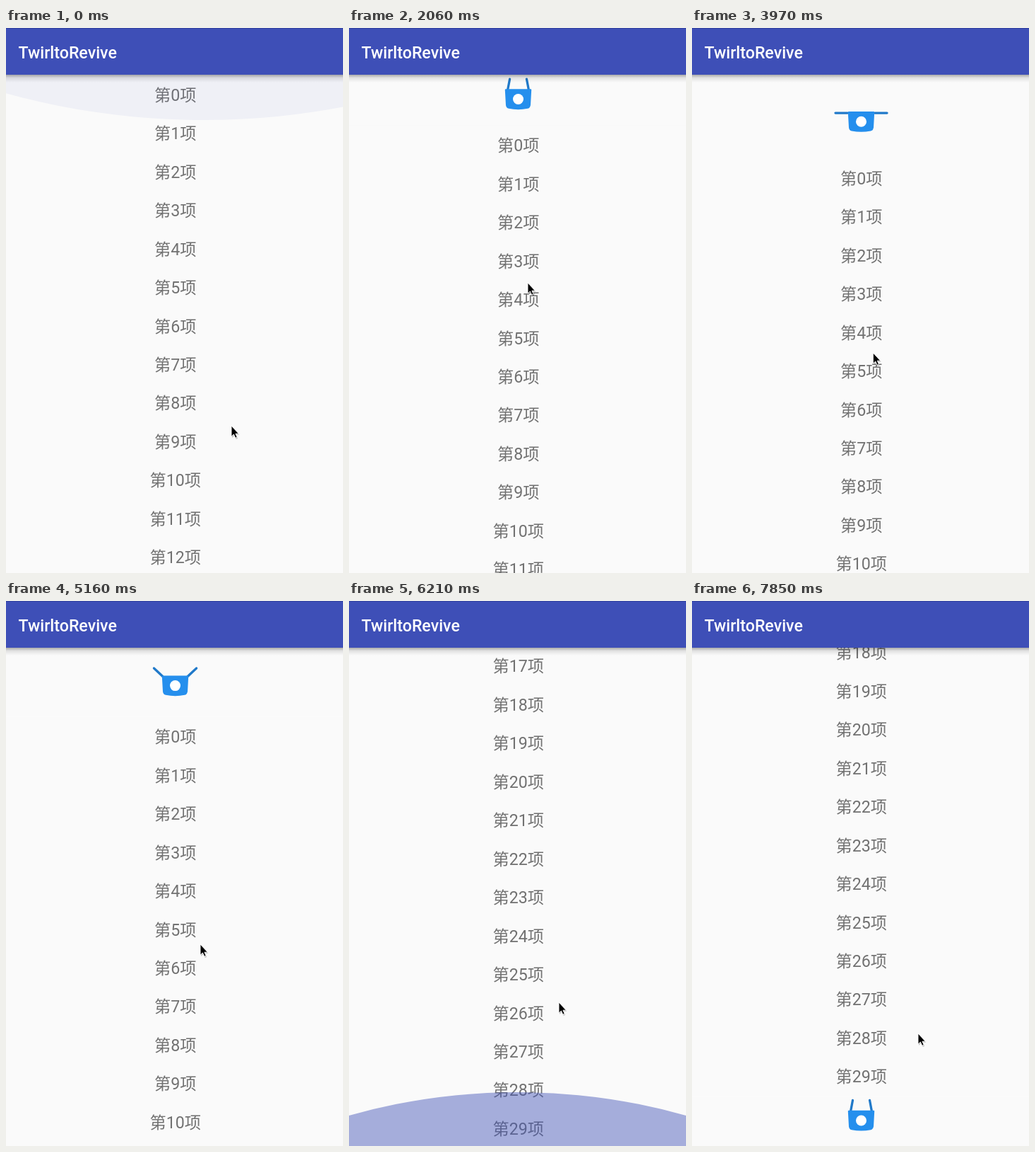
Recreate the animation shown at these times as an HTML page. Size 477x770 px, loop 8000 ms.

```html
<!DOCTYPE html>
<html lang="zh-CN">
<head>
<meta charset="utf-8">
<title>Pull list</title>
<style>
  html, body { margin: 0; width: 100%; height: 100%; overflow: hidden; background: #fafafa; }
  svg { display: block; width: 477px; height: 770px; }
  text { font-family: Roboto, "Noto Sans CJK SC", "Noto Sans CJK", sans-serif; font-size: 23.2px; }
  #items text { fill: #727272; text-anchor: middle; }
  .title { fill: #fff; font-weight: 500; }
  .arm { stroke: #2079c9; stroke-width: 3.3; stroke-linecap: round; }
</style>
</head>
<body>
<svg viewBox="0 0 477 770">
  <defs>
    <linearGradient id="shade" x2="0" y2="1">
      <stop offset="0" stop-color="#000" stop-opacity=".32"/>
      <stop offset=".4" stop-color="#000" stop-opacity=".1"/>
      <stop offset="1" stop-color="#000" stop-opacity="0"/>
    </linearGradient>
  </defs>
  <rect width="477" height="770" fill="#fafafa"/>

  <g id="bag">
    <line id="armL" class="arm" x1="-15.5" y1="-12" x2="-15.5" y2="-29.2"/>
    <line id="armR" class="arm" x1="15.5" y1="-12" x2="15.5" y2="-29.2"/>
    <path fill="#258fed" d="M-17.7 -14.2H17.7Q18.8 -14.2 18.7 -13L17.5 8.5Q17 12.5 13.5 13.2Q0 16 -13.5 13.2Q-17 12.5 -17.5 8.5L-18.7 -13Q-18.8 -14.2 -17.7 -14.2Z"/>
    <circle r="7.5" fill="#fff"/>
  </g>

  <g id="list">
    <rect y="66" width="477" height="1634.8" fill="#fafafa"/>
    <g id="items"></g>
  </g>

  <circle id="topGlow" cx="280" cy="-930" r="1060" fill="#3f51b5"/>
  <circle id="endGlow" cx="238.5" cy="1572" r="878" fill="#3f51b5"/>

  <rect y="66" width="477" height="11" fill="url(#shade)"/>
  <rect width="477" height="66" fill="#3e4fb7"/>
  <rect width="477" height="1" fill="#303f9f"/>
  <text class="title" x="17.5" y="43">TwirltoRevive</text>

  <g id="cursor">
    <path d="M1 1.5V17L4.4 13.8L6.7 19L9.2 18L6.9 12.8H11.4Z" fill="#000" opacity=".2"/>
    <path d="M0 0V15.2L3.4 12L5.7 17.2L8.2 16.2L5.9 11.2H10.4Z" fill="#000" stroke="#fff" stroke-width=".9"/>
  </g>
</svg>
<script>
const LOOP = 8000, STEP = 148, ROW = 54.45, END = -928;

// Pointer moves: start, end, then the place reached
const moves = [
  [142, 882, 249, 277], [1100, 2066, 253, 360], [2066, 2954, 237, 432],
  [3690, 4280, 275, 485], [5174, 6210, 297, 567], [6210, 6990, 304, 698],
  [6990, 7246, 306, 680], [7246, 7838, 320, 611]
];

const $ = id => document.getElementById(id);
const set = (id, name, value) => $(id).setAttribute(name, value);
const move = (id, x, y) => set(id, 'transform', `translate(${x} ${y})`);
const clamp = (v, lo, hi) => Math.min(hi, Math.max(lo, v));
const ramp = (t, start, end) => clamp((t - start) / (end - start), 0, 1);
const ease = (t, start, end) => {
  const k = ramp(t, start, end);
  return k * k * (3 - 2 * k);
};

// The picture advances in even steps
const snap = t => 290 + STEP * Math.floor((t - 270) / STEP);

function scrollAt(t) {
  const drag = 71.5 * ramp(t, 1100, 2066) + 105.5 * ramp(t, 2066, 2954);
  const settle = 59 * ease(t, 3090, 3400);
  const close = 118 * ease(t, 5071, 5460);
  const fling = END * ease(t, 5460, 6060);
  const lift = 15.7 * ramp(t, 6960, 7246) + 57.8 * ramp(t, 7246, 7838);
  return drag - settle - close + fling - lift;
}

function pointerAt(t) {
  let x = 319, y = 562;
  for (const [start, end, toX, toY] of moves) {
    const k = ramp(t, start, end);
    x += (toX - x) * k;
    y += (toY - y) * k;
  }
  const swipe = 120 * Math.sin(Math.PI * ramp(t, 5470, 6060));
  return [x, y - swipe];
}

for (let i = 0; i < 30; i++) {
  const label = document.createElementNS('http://www.w3.org/2000/svg', 'text');
  label.setAttribute('x', 239.7);
  label.setAttribute('y', 102.8 + i * ROW);
  label.textContent = `第${i}项`;
  $('items').append(label);
}

function draw(time) {
  const t = snap(time);
  const y = scrollAt(t);
  const atTop = y > END / 2;
  const pull = Math.max(0, atTop ? y : END - y);
  const bagY = atTop ? 31.5 + 1.137 * pull - .0024 * pull * pull : 770.75 - pull / 2;
  const angle = clamp(47 + (pull - 97.5) * 2.4, -11, 90);

  move('list', 0, y);
  move('bag', 239.5, bagY);
  set('armL', 'transform', `rotate(${-angle} -17.5 -10.2)`);
  set('armR', 'transform', `rotate(${angle} 17.5 -10.2)`);
  move('cursor', ...pointerAt(t));

  const glow = t < 6210 ? 0 : 1 - ramp(t, 6210, 6800);
  set('topGlow', 'opacity', .055 * (1 - ramp(t, 142, 438)));
  set('endGlow', 'opacity', glow * .46);
  move('endGlow', 0, (1 - glow) * 76);
}

function tick() {
  draw(performance.now() % LOOP);
  requestAnimationFrame(tick);
}
tick();
</script>
</body>
</html>
```
